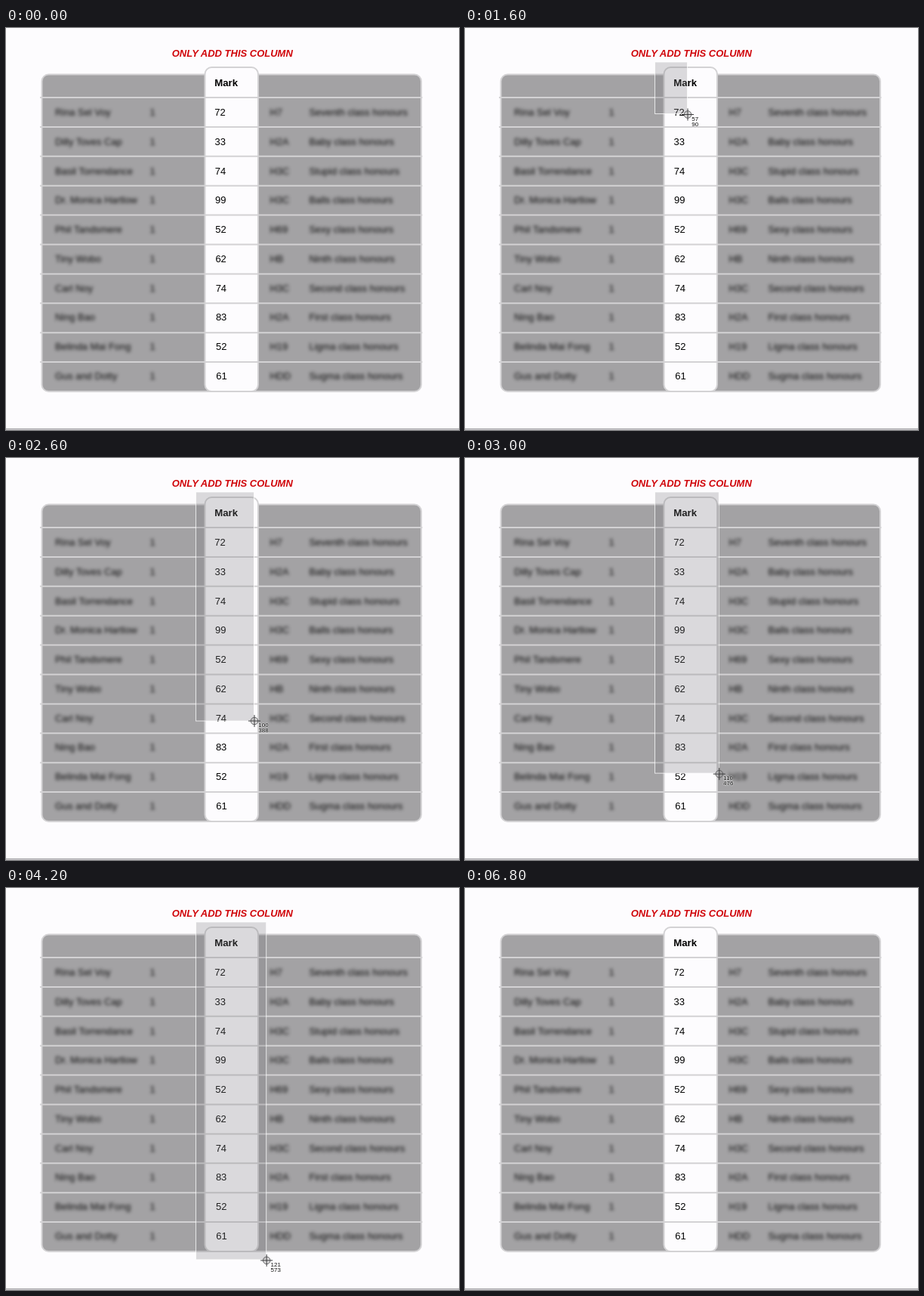
Write an HTML page that moves like this. It is 600 px wide and 532 px high and loops after 7000 ms.

```html
<!DOCTYPE html>
<html lang="en">
<head>
<meta charset="utf-8">
<title>Column selection</title>
<style>
  html, body { margin: 0; width: 100%; height: 100%; overflow: hidden; background: #fdfcfe; }
  svg { display: block; width: 100%; height: 100%; }
  text { font: 13px "Liberation Sans", Arial, sans-serif; }
  .title { font-weight: bold; font-style: italic; fill: #d00409; text-anchor: middle; }
  .head { font-weight: bold; font-size: 13.2px; }
  .blurred { filter: blur(1.9px); fill: #0c0c0c; }
  .blurred text { font-size: 12.9px; }
  .edge { stroke: #d3d2d4; stroke-width: 2; }
  .selection { fill: rgba(124, 124, 126, .27); stroke: rgba(255, 255, 255, .75); }
  .label text { font-size: 8px; fill: #111; stroke: rgba(255, 255, 255, .6); stroke-width: 1.2px; paint-order: stroke; }
</style>
</head>
<body>
<svg viewBox="0 0 600 532">
  <rect width="600" height="532" fill="#fdfcfe"/>
  <path d="M0 530.8H600" stroke="#77767a"/>
  <text class="title" x="299.8" y="38">ONLY ADD THIS COLUMN</text>
  <rect class="edge" x="47.5" y="61.5" width="502.5" height="419.5" rx="9" fill="#a3a2a4"/>
  <g id="blurred" class="blurred"></g>
  <rect class="edge" x="263.5" y="52" width="70.5" height="429" rx="9" fill="#fdfcfe"/>
  <path id="lines" class="edge"/>
  <text class="head" x="276.3" y="77">Mark</text>
  <g id="marks"></g>
  <rect id="selection" class="selection" x="251.5" y="45"/>
  <g id="cross">
    <circle r="4.8" fill="rgba(150,150,150,.35)" stroke="#5a5a5c" stroke-width=".9"/>
    <path d="M-8 0H8M0-8V8" stroke="#3c3c3e" stroke-width="1"/>
    <g class="label"><text id="labelX" x="5.3" y="8"/><text id="labelY" x="5.3" y="15"/></g>
  </g>
  <path id="arrow" transform="translate(345.4 492.4)" d="M0 0V11.6L2.6 9.1L4.6 13.7L6.6 12.8L4.6 8.4H8.2Z"
        fill="#000" stroke="#fff" stroke-width="1.1" paint-order="stroke" stroke-linejoin="round"/>
</svg>
<script>
const rows = [
  ["Rina Sel Voy", 72, "H7", "Seventh"],
  ["Dilly Toves Cap", 33, "H2A", "Baby"],
  ["Basil Torrendance", 74, "H3C", "Stupid"],
  ["Dr. Monica Hartlow", 99, "H3C", "Balls"],
  ["Phil Tandsmere", 52, "H69", "Sexy"],
  ["Tiny Wobo", 62, "HB", "Ninth"],
  ["Carl Noy", 74, "H3C", "Second"],
  ["Ning Bao", 83, "H2A", "First"],
  ["Belinda Mai Fong", 52, "H19", "Ligma"],
  ["Gus and Dotty", 61, "HDD", "Sugma"]
];
const $ = id => document.getElementById(id);

function addText(parent, x, y, content) {
  const el = document.createElementNS("http://www.w3.org/2000/svg", "text");
  el.setAttribute("x", x);
  el.setAttribute("y", y);
  el.textContent = content;
  parent.append(el);
}

let lines = "";
rows.forEach(([name, mark, grade, rank], i) => {
  const y = 116.2 + i * 38.75;
  lines += `M45 ${92 + i * 38.9}H551.5`;
  addText($("blurred"), 65, y, name);
  addText($("blurred"), 190.5, y, "1");
  addText($("blurred"), 349.5, y, grade);
  addText($("blurred"), 401.5, y, rank + " class honours");
  addText($("marks"), 276.2 + i * 0.24, y, mark);
});
$("lines").setAttribute("d", lines);

// time, pointer x, pointer y, selection bottom, label x, label y
const hover = [
  [200, 275, 3, 45, 512, 160],
  [500, 263, 22, 45, 496, 185],
  [900, 251, 45, 45, 480, 215]
];
const drag = [
  [1100, 252, 45, 45, 0, 0],
  [1600, 295, 114.5, 113.5, 57, 90],
  [1900, 309, 172, 168, 75, 163],
  [2200, 322.5, 230.5, 225, 92, 238],
  [2600, 329, 348, 348, 100, 388],
  [2700, 331, 368, 367, 103, 412],
  [3400, 344.5, 485, 484, 120, 562],
  [3500, 344.5, 485, 484, 120, 562],
  [4300, 345.3, 494, 493, 121, 574]
];

function sample(keys, t) {
  const next = keys.findIndex(k => k[0] >= t);
  if (next < 0) return keys[keys.length - 1];
  if (next === 0) return keys[0];
  const a = keys[next - 1], b = keys[next];
  const p = (t - a[0]) / (b[0] - a[0]);
  return a.map((v, i) => v + (b[i] - v) * p);
}

const show = (id, on) => $(id).setAttribute("visibility", on ? "visible" : "hidden");

function draw(now) {
  const t = Math.floor((now % 7000) / 100) * 100;
  const dragging = t >= 1200 && t < 4700;
  const [, x, y, bottom, labelX, labelY] = sample(t < 1200 ? hover : drag, t);
  show("cross", t >= 200 && t < 4700);
  show("selection", dragging);
  show("arrow", t >= 4700 && t < 5200);
  $("cross").setAttribute("transform", `translate(${x} ${y})`);
  if (dragging) {
    $("selection").setAttribute("width", x - 252);
    $("selection").setAttribute("height", bottom - 45);
  }
  $("labelX").textContent = Math.round(labelX);
  $("labelY").textContent = Math.round(labelY);
}

const start = performance.now();
function loop() {
  draw(performance.now() - start);
  requestAnimationFrame(loop);
}
loop();
</script>
</body>
</html>
```
